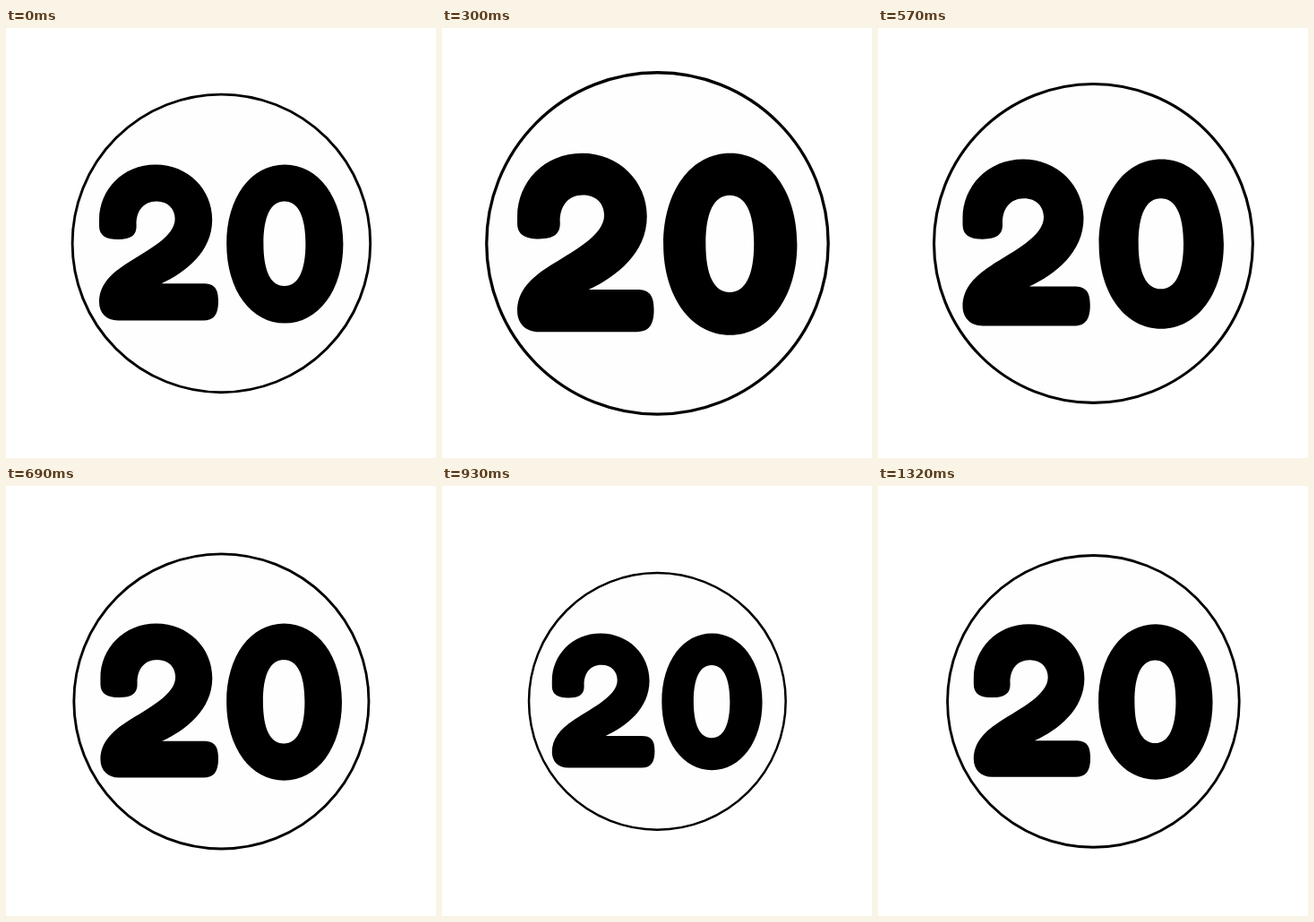
These frames come from a looping animation (480 by 480 pixels, 1.35 s). An HTML page without scripts:

```html
<!DOCTYPE html>
<html lang="en">
<head>
<meta charset="utf-8">
<title>Pulsing 20</title>
<style>
  @property --phase {
    syntax: "<angle>";
    inherits: false;
    initial-value: 0deg;
  }
  html, body {
    margin: 0;
    width: 100%;
    height: 100%;
    overflow: hidden;
    background: #fff;
  }
  svg {
    display: block;
    width: 100%;
    height: 100%;
  }
  /* Sine pulse around the stage centre, held for 30 ms per step */
  .badge {
    transform-origin: 240px 240px;
    transform: scale(calc(1 + 0.149 * sin(var(--phase))));
    animation: pulse 1350ms steps(45) infinite;
  }
  @keyframes pulse {
    from { --phase: 0deg; }
    to { --phase: 360deg; }
  }
</style>
</head>
<body>
<svg viewBox="0 0 480 480" role="img" aria-label="20">
  <g class="badge">
    <circle cx="240.4" cy="240.4" r="166.3" fill="#fefefe" stroke="#000" stroke-width="2.9"/>
    <path class="two" d="M145.6 220
      C145 205 153 193.4 168 193.4 C181 193.4 188.6 202 188.6 213
      C188.6 233 158 248 133 264 C113 277 104 290 104 306
      C104 318 112 326.5 125 326.5 H220
      C232 326.5 237 320 237 305 C237 290 232 285.3 220 285.3 H173.5
      C200 273 230.2 250 230.2 214 C230.2 180 203 152.5 167 152.5
      C130 152.5 104 181 104 214 V221
      C104 232 112 236 125 236 C140 236 146 231 145.6 220Z"/>
    <path class="zero" fill-rule="evenodd" d="M311.2 152.5
      C348.5 152.5 376.4 189 376.4 241 S348.5 329.6 311.2 329.6
      S246.2 293 246.2 241 S273.5 152.5 311.2 152.5Z
      M310.8 193.5
      C326 193.5 334.4 210 334.4 240.7 S326 288 310.8 288
      S287.4 271.4 287.4 240.7 S295.6 193.5 310.8 193.5Z"/>
  </g>
</svg>
</body>
</html>
```
